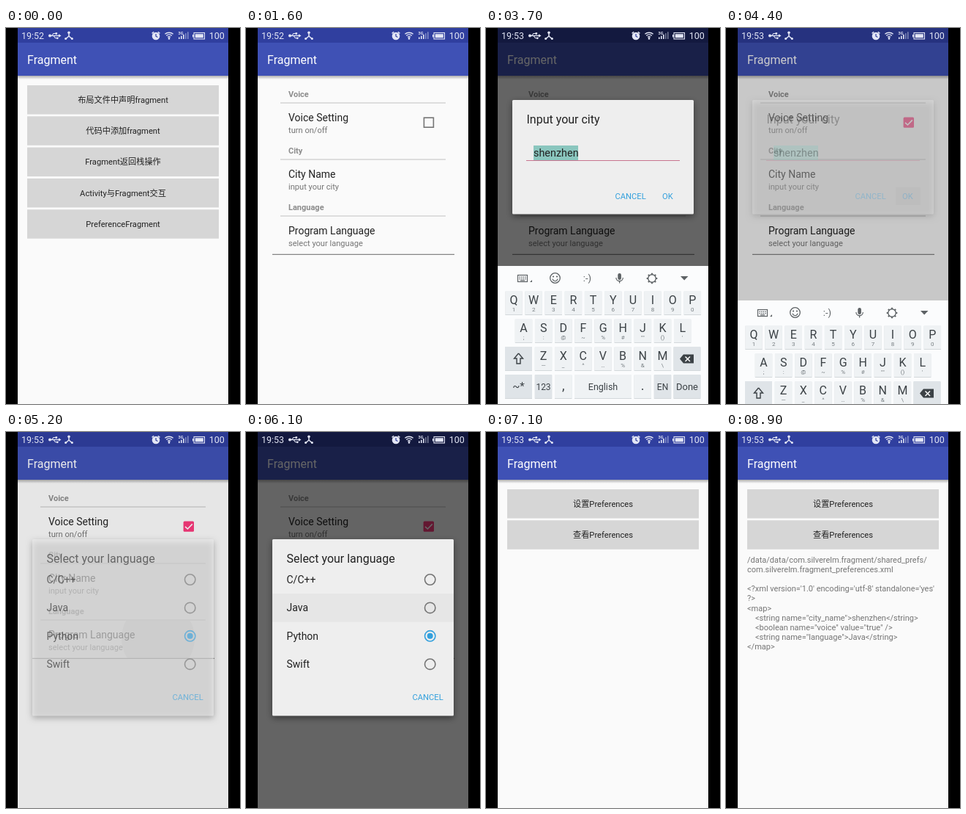
An HTML page with a canvas for the animation above (9.2 s loop, 320 by 512 pixels).

```html
<!DOCTYPE html>
<html lang="zh-CN">
<head>
<meta charset="utf-8">
<title>Fragment</title>
<style>
html, body { margin: 0; width: 100%; height: 100%; overflow: hidden; background: #000; }
canvas { display: block; width: 320px; height: 512px; }
</style>
</head>
<body>
<canvas id="stage"></canvas>
<script>
const LOOP = 9200, STEP = 100;
const canvas = document.getElementById('stage');
const dpr = window.devicePixelRatio || 1;
canvas.width = 320 * dpr;
canvas.height = 512 * dpr;
const c = canvas.getContext('2d');
const INK = '#222', GREY = '#757575', BLUE = '#33a0dd', PINK = '#f93a7c';
let t = 0;

const ramp = (a, b) => Math.max(0, Math.min(1, (t - a) / (b - a)));

function text(s, x, y, size, color, weight = 400, align = 'left') {
  c.font = `${weight} ${size}px Roboto, "Noto Sans CJK SC", sans-serif`;
  c.fillStyle = color;
  c.textAlign = align;
  c.fillText(s, x, y);
}
function rect(x, y, w, h, color) {
  c.fillStyle = color;
  c.fillRect(x, y, w, h);
}
function round(x, y, w, h, r, color) {
  c.beginPath();
  c.roundRect(x, y, w, h, r);
  c.fillStyle = color;
  c.fill();
}
function line(points, color, width = 1) {
  c.beginPath();
  points.forEach(([x, y]) => c.lineTo(x, y));
  c.strokeStyle = color;
  c.lineWidth = width;
  c.stroke();
}
function dot(x, y, r, color) {
  c.beginPath();
  c.arc(x, y, r, 0, 7);
  c.fillStyle = color;
  c.fill();
}
function ring(x, y, r, color, width, from = 0, to = 7) {
  c.beginPath();
  c.arc(x, y, r, from, to);
  c.strokeStyle = color;
  c.lineWidth = width;
  c.stroke();
}
function poly(points, color) {
  c.beginPath();
  points.forEach(([x, y]) => c.lineTo(x, y));
  c.fillStyle = color;
  c.fill();
}

// Touch feedback: a circle growing inside a box, then fading
function ripple(x, y, w, h, cx, cy, start) {
  const age = t - start;
  if (age < 0 || age >= 500) return;
  c.save();
  c.beginPath();
  c.rect(x, y, w, h);
  c.clip();
  dot(cx, cy, 20 + age * .3, `rgba(0,0,0,${.08 * Math.min(1, (500 - age) / 300)})`);
  c.restore();
}

function chrome() {
  rect(16, 0, 288, 512, '#fafafa');
  const shade = c.createLinearGradient(0, 65, 0, 70);
  shade.addColorStop(0, 'rgba(0,0,0,.3)');
  shade.addColorStop(1, 'rgba(0,0,0,0)');
  rect(16, 65, 288, 5, shade);
  rect(16, 20, 288, 45, '#3f51b5');
  rect(16, 0, 288, 20, '#303f9f');
  text('Fragment', 29, 49, 16, '#fff');
}

function buttons(labels) {
  labels.forEach((label, i) => {
    const y = 78 + i * 42.3;
    rect(29, y, 262, 39.5, '#d6d6d6');
    text(label, 160, y + 23.8, 11.2, INK, 400, 'center');
  });
}

function menuPage() {
  chrome();
  buttons(['布局文件中声明fragment', '代码中添加fragment', 'Fragment返回栈操作',
    'Activity与Fragment交互', 'PreferenceFragment']);
  ripple(29, 247, 262, 40, 160, 267, 200);
}

function buttonPage() {
  chrome();
  buttons(['设置Preferences', '查看Preferences']);
  ripple(29, 78, 262, 39, 160, 98, 1300);
  ripple(29, 120, 262, 39, 160, 140, 8000);
  if (t >= 8300) {
    [
      '/data/data/com.silverelm.fragment/shared_prefs/',
      'com.silverelm.fragment_preferences.xml',
      '',
      "<?xml version='1.0' encoding='utf-8' standalone='yes'",
      '?>',
      '<map>',
      '    <string name="city_name">shenzhen</string>',
      '    <boolean name="voice" value="true" />',
      '    <string name="language">Java</string>',
      '</map>'
    ].forEach((s, i) => text(s, 29, 178 + i * 13.1, 11, GREY));
  }
}

function prefsPage() {
  chrome();
  [
    ['Voice', 'Voice Setting', 'turn on/off'],
    ['City', 'City Name', 'input your city'],
    ['Language', 'Program Language', 'select your language']
  ].forEach(([head, title, note], i) => {
    const y = i * 77;
    text(head, 58, 94 + y, 11, '#8c8c8c', 700);
    rect(47, 101.5 + y, 226, 1, '#c2c2c2');
    text(title, 58, 126.6 + y, 14, INK);
    text(note, 58, 143 + y, 11.1, GREY);
  });
  rect(36, 307.8, 249, 1, '#686868');
  if (t < 2400) {
    c.strokeStyle = GREY;
    c.lineWidth = 1.6;
    c.strokeRect(243.4, 122.2, 13, 13);
  } else {
    round(242.6, 121.4, 14.4, 14.4, 1.5, PINK);
    line([[245, 128.8], [248.4, 132], [254.8, 125.4]], '#fff', 1.6);
  }
  ripple(36, 103, 249, 51, 200, 130, 2300);
  ripple(36, 180, 249, 51, 180, 206, 3400);
  ripple(36, 257, 249, 51, 208, 281, 5100);
}

function panel(y, h, title) {
  c.save();
  c.shadowColor = 'rgba(0,0,0,.45)';
  c.shadowBlur = 8 * dpr;
  c.shadowOffsetY = 3 * dpr;
  round(36, y, 248, h, 1.5, '#eee');
  c.restore();
  text(title, 55.5, y + 32, 16, INK);
}

function cityDialog() {
  panel(98, 155.5, 'Input your city');
  rect(65, 160, 61, 20, '#8ac6be');
  text('shenzhen', 65, 175.4, 14.4, INK);
  rect(55, 180, 210, 1, '#c8748f');
  text('CANCEL', 176.5, 232.5, 11.2, BLUE);
  text('OK', 241, 232.5, 11.2, BLUE);
  ripple(232, 217, 34, 24, 249, 229, 4100);
}

function languageDialog() {
  panel(146, 240.5, 'Select your language');
  if (t >= 6000) rect(36, 220, 248, 38.5, '#e6e6e6');
  const chosen = t >= 6200 ? 1 : 2;
  ['C/C++', 'Java', 'Python', 'Swift'].forEach((name, i) => {
    const y = 201 + i * 38.4, on = i === chosen;
    text(name, 55.5, y + 5, 14, INK);
    ring(251.7, y, 7.2, on ? BLUE : GREY, 1.6);
    if (on) dot(251.7, y, 4, BLUE);
  });
  text('CANCEL', 227.5, 365, 11.2, BLUE);
}

function keyIcons() {
  const k = '#5d6265';
  c.strokeStyle = k;
  c.lineWidth = 1.2;
  c.strokeRect(43.5, 336.5, 13, 9);
  for (let i = 0; i < 8; i++) rect(45.5 + i % 4 * 2.6, 338.5 + (i >> 2) * 2.4, 1.4, 1.4, k);
  rect(47, 343.2, 6, 1.2, k);
  poly([[63, 343], [63, 346], [60, 346]], k);
  ring(94.5, 340.5, 6.8, k, 1.3);
  dot(92, 338.5, 1.1, k);
  dot(97, 338.5, 1.1, k);
  ring(94.5, 341, 3.6, k, 1.2, .2, 2.94);
  text(':-)', 138.5, 345, 13, k, 400, 'center');
  round(180.3, 334, 4.6, 9, 2.3, k);
  ring(182.6, 340, 4.7, k, 1.2, 0, Math.PI);
  line([[182.6, 344.5], [182.6, 347.5]], k, 1.3);
  ring(227, 341, 5.3, k, 1.4);
  for (let i = 0; i < 8; i++) {
    const a = i * Math.PI / 4, x = Math.cos(a), y = Math.sin(a);
    line([[227 + x * 5.3, 341 + y * 5.3], [227 + x * 7.3, 341 + y * 7.3]], k, 2);
  }
  poly([[266, 338], [276.5, 338], [271.2, 343.5]], k);
}

function keyboard() {
  const light = '#eff2f4', dark = '#dfe4e8', k = '#3c4246';
  rect(16, 324, 288, 188, '#fbfcfd');
  keyIcons();
  const key = (x, y, w, color, label, size = 12) => {
    rect(x, y + 1, w, 32, '#d3d8db');
    rect(x, y, w, 32, color);
    if (label) text(label, x + w / 2, y + 20.5, size, k, 400, 'center');
  };
  [
    ['QWERTYUIOP', 38, 358, '1 2 3 4 5 6 7 8 9 0'],
    ['ASDFGHJKL', 51.5, 396, '; : @ ~ % # "" () \''],
    ['ZXCVBNM', 78.5, 434, '— _ ^ … % & \\']
  ].forEach(([letters, x0, y, hints]) => {
    const hint = hints.split(' ');
    [...letters].forEach((ch, i) => {
      const x = x0 + i * 27.15;
      key(x - 11.7, y, 23.4, light);
      text(ch, x, y + 18, 16, k, 400, 'center');
      text(hint[i], x, y + 28, 8, '#777e82', 400, 'center');
    });
  });
  key(26, 434, 37, dark);
  line([[44.5, 443], [50.5, 450], [47, 450], [47, 457], [42, 457], [42, 450], [38.5, 450], [44.5, 443]], k, 1.4);
  key(256.5, 434, 37, dark);
  poly([[265, 450.5], [270, 444.5], [284, 444.5], [284, 456.5], [270, 456.5]], k);
  line([[272.5, 447.5], [279, 454]], '#fff', 1.4);
  line([[279, 447.5], [272.5, 454]], '#fff', 1.4);
  key(26, 472, 37, dark, '~*', 15);
  key(66.8, 472, 23.4, dark, '123');
  key(94, 472, 23.4, light, ',', 18);
  key(121, 472, 78, light, 'English', 12.5);
  key(202.5, 472, 23.4, light, '.', 18);
  key(229.8, 472, 23.4, dark, 'EN');
  key(256.5, 472, 37, dark, 'Done', 13);
}

function statusIcons() {
  const w = '#e3e6f5';
  text(t < 2300 ? '19:52' : '19:53', 21, 15, 12.5, w);
  text('100', 277.7, 15, 12.5, w);
  // USB trident
  line([[59, 10.5], [73, 10.5]], w, 1.3);
  dot(60, 10.5, 2, w);
  poly([[72, 8.2], [75.5, 10.5], [72, 12.8]], w);
  line([[62.5, 10.5], [65, 7.5], [68, 7.5]], w, 1.1);
  line([[65, 10.5], [67.5, 13.8], [70, 13.8]], w, 1.1);
  rect(67.5, 6.2, 2.6, 2.6, w);
  dot(70.3, 13.8, 1.4, w);
  // Three-armed symbol
  line([[86, 6], [86, 11], [81.5, 15]], w, 1.5);
  line([[86, 11], [90.5, 15]], w, 1.5);
  dot(86, 6.2, 1.8, w);
  dot(81.6, 14.6, 1.5, w);
  dot(90.4, 14.6, 1.5, w);
  // Alarm
  dot(205, 11, 5.3, w);
  line([[199.6, 7.4], [202.2, 5.2]], w, 1.5);
  line([[210.4, 7.4], [207.8, 5.2]], w, 1.5);
  line([[205, 8], [205, 11.2], [207.4, 12.6]], '#303f9f', 1.2);
  // Wi-Fi
  [2.8, 5.6, 8.4].forEach(r => ring(223, 14.6, r, w, 1.4, -2.3, -.84));
  dot(223, 14.4, 1.3, w);
  // Mobile signal
  text('3G', 235.5, 9, 5.5, w, 700);
  for (let i = 0; i < 5; i++) {
    const h = 2.5 + i * 1.8;
    rect(236 + i * 3, 15 - h, 1.6, h, i < 3 ? w : 'rgba(227,230,245,.45)');
  }
  // Battery
  c.strokeStyle = w;
  c.lineWidth = 1.1;
  c.strokeRect(257, 6.5, 14.5, 8.5);
  rect(258.7, 8.2, 11.1, 5.1, w);
  rect(255, 9, 1.6, 3.5, w);
}

function overlay(dim, alpha, draw, dy = 0) {
  rect(16, 0, 288, 512, `rgba(0,0,0,${dim})`);
  c.save();
  c.globalAlpha = alpha;
  c.translate(0, dy);
  draw();
  c.restore();
}

function scene() {
  if (t < 1000) {
    menuPage();
    const p = ramp(500, 1000);
    if (p > 0) {
      c.save();
      c.globalAlpha = p;
      c.translate(0, 41 * (1 - p) ** 2);
      buttonPage();
      c.restore();
    }
  } else if (t < 1600 || t >= 7100) {
    buttonPage();
  } else {
    prefsPage();
  }

  if (t >= 3500 && t < 4700) {
    const out = 1 - ramp(4200, 4500);
    const keys = ramp(3500, 3700) * (1 - ramp(4300, 4700));
    const lift = t < 4000 ? keys : 1;
    overlay(.6 * ramp(3470, 3700) * out, (t < 3600 ? .6 : 1) * out, cityDialog, 90 * (1 - lift));
    c.save();
    c.translate(0, 188 * (1 - keys));
    if (keys) keyboard();
    c.restore();
  }
  if (t >= 5200 && t < 6400) {
    const out = 1 - ramp(6100, 6400);
    const dim = t < 5300 ? .08 : .6 * ramp(5150, 5500);
    overlay(dim * out, (t < 5300 ? .62 : 1) * out, languageDialog);
  }
}

function frame(now) {
  t = Math.floor(now % LOOP / STEP) * STEP;
  c.setTransform(dpr, 0, 0, dpr, 0, 0);
  rect(0, 0, 320, 512, '#000');
  c.save();
  c.beginPath();
  c.rect(16, 0, 288, 512);
  c.clip();
  scene();
  statusIcons();
  c.restore();
  requestAnimationFrame(frame);
}
requestAnimationFrame(frame);
</script>
</body>
</html>
```
